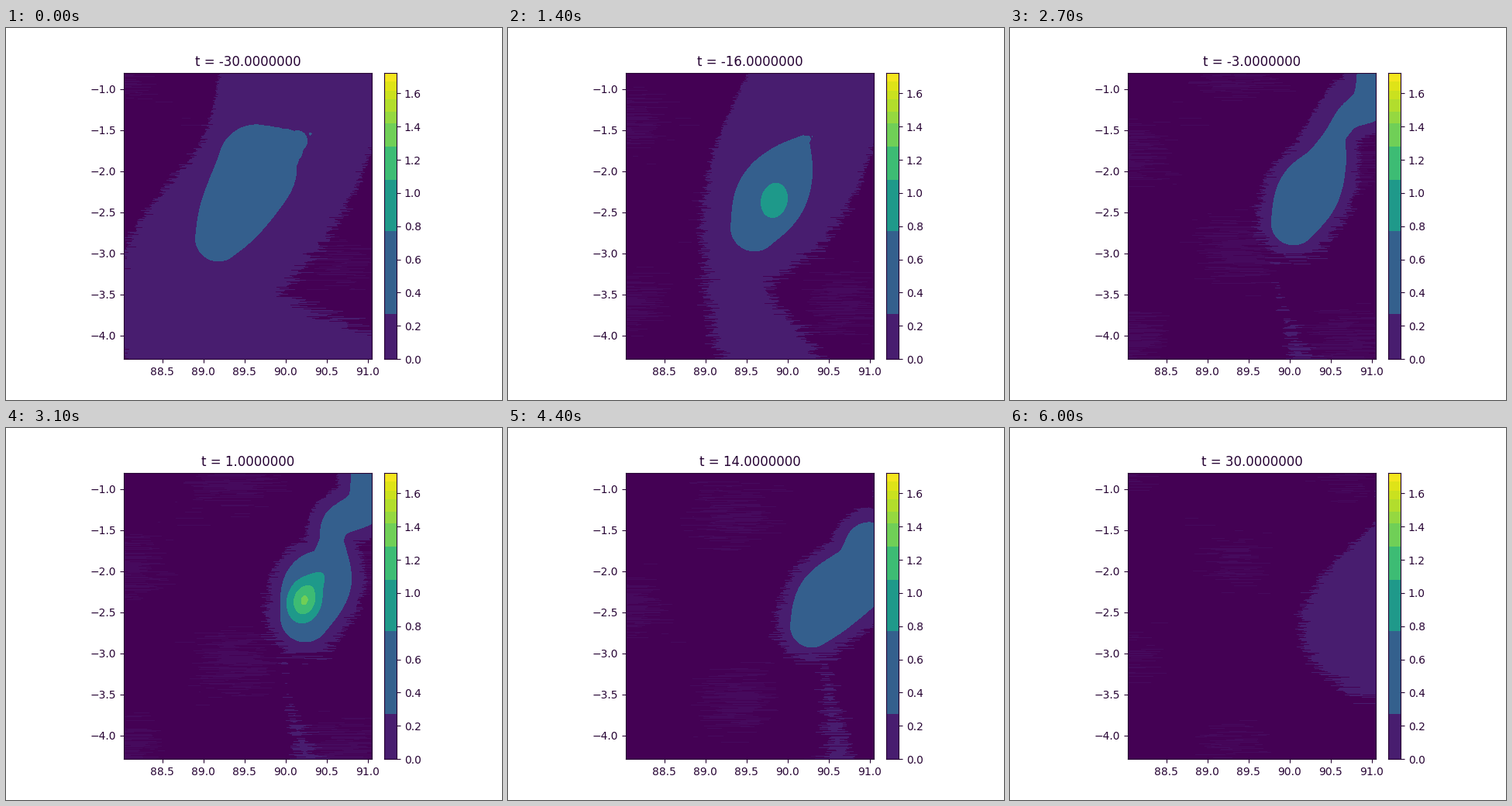
A matplotlib script for the animation above (6100 ms loop, 640 by 480 pixels).

```python
import numpy as np
import matplotlib.pyplot as plt
from matplotlib.animation import FuncAnimation
from matplotlib.colors import ListedColormap

W, H = 640, 480
LEFT, TOP, WIDTH, HEIGHT = 152, 57.6, 320, 369.6
INK = "#260333"
LEVELS = [0, 0.27, 0.77, 1.08, 1.28, 1.42, 1.49, 1.565, 1.615, 1.67, 1.725]
BANDS = [plt.cm.viridis((low + high) / 2 / LEVELS[-1])
         for low, high in zip(LEVELS, LEVELS[1:])]
PALETTE = ["#440154", "#460a5d"] + BANDS
HAZE, PURPLE, BLUE = 1, 2, 3

plt.rcParams["font.family"] = "DejaVu Sans"
for name in ("text.color", "axes.edgecolor", "xtick.color", "ytick.color"):
    plt.rcParams[name] = INK

xs = LEFT + np.arange(320, dtype=np.float32) + 0.5
ys = TOP + np.arange(370, dtype=np.float32) + 0.5
X, Y = np.meshgrid(xs, ys)

# Shapes are chains of circles (x, y, radius), keyed by time
BODY = {
    -30: [(274, 272, 30), (294, 237, 44), (321, 189, 52), (323, 174, 49)],
    -16: [(318, 258, 31), (338, 220, 45), (357, 188, 36), (381, 147, 8)],
    -8: [(341, 260, 26), (365, 222, 36), (394, 170, 25), (417, 134, 12)],
    1: [(386, 245, 32), (400, 207, 43), (416, 184, 29), (420, 146, 15)],
    14: [(392, 256, 28), (416, 222, 43), (457, 187, 40), (466, 153, 31)],
    22: [(410, 234, 19), (430, 222, 27), (462, 195, 35), (466, 160, 27)],
    30: [(470, 180, -18), (474, 175, -15), (478, 170, -12), (478, 160, -15)],
}
ARM = {
    -8: [(448, 107, 13), (470, 88, 25), (487, 50, 34)],
    1: [(428, 122, 19), (466, 98, 26), (487, 50, 42)],
}
CLOUD = {
    -30: [(390, 60, 112), (345, 190, 102), (235, 370, 100), (430, 465, 80)],
    -16: [(410, 60, 90), (350, 200, 92), (295, 330, 40), (340, 440, 60)],
    22: [(475, 150, 50), (420, 230, 58), (440, 300, 60), (455, 440, 75)],
    30: [(482, 152, 30), (432, 250, 55), (455, 300, 40), (457, 316, 34)],
}


def pose(keys, t):
    """Nodes at time t, moving evenly from key to key."""
    times = list(keys)
    k = min(max(np.searchsorted(times, t), 1), len(times) - 1)
    a, b = times[k - 1], times[k]
    u = np.clip((t - a) / (b - a), 0, 1)
    return (1 - u) * np.array(keys[a], float) + u * np.array(keys[b], float)


def spline(nodes, steps=9):
    """Open Catmull-Rom curve through the nodes."""
    p = np.vstack([nodes[:1], nodes, nodes[-1:]])[:, None]
    p0, p1, p2, p3 = p[:-3], p[1:-2], p[2:-1], p[3:]
    u = np.arange(steps)[None, :, None] / steps
    curve = 0.5 * (2 * p1 + (p2 - p0) * u
                   + (2 * p0 - 5 * p1 + 4 * p2 - p3) * u ** 2
                   + (3 * p1 - p0 - 3 * p2 + p3) * u ** 3)
    return np.vstack([curve.reshape(-1, 3), nodes[-1:]])


def depth(nodes):
    """Distance inside the chain in pixels, negative outside."""
    field = np.full(X.shape, -1e4, np.float32)
    for x, y, r in spline(nodes).astype(np.float32):
        np.maximum(field, r - np.sqrt((X - x) ** 2 + (Y - y) ** 2), out=field)
    return field


def blob(t):
    body = pose(BODY, t)
    arm = pose(ARM, t)
    arm[:, 2] -= np.interp(t, [-13, -8, 1, 6], [45, 0, 0, 45])
    return np.maximum(depth(body), depth(np.vstack([body[-1:], arm])))


def cloud(t):
    nodes = pose(CLOUD, t)
    nodes[:, 2] -= np.interp(t, [-16, -8, 14, 22], [0, 50, 55, 0])
    return depth(nodes)


def pulse(t, middle, width):
    return np.exp(-((t - middle) / width) ** 2)


def core(t):
    """Height of the bright centre, which drifts right and flares twice."""
    dx = X - (343.5 + 2.44 * (t + 16))
    dy = Y - 223
    dx = dx + 0.1 * dy
    peak = 0.7 + 0.34 * pulse(t, -16, 4) + 1.02 * pulse(t, 4, 4.15)
    main = peak * np.exp(-dx ** 2 / 1000 - dy ** 2 / 1700)
    side = 0.35 * pulse(t, 1, 4)
    return main + side * np.exp(-((dx - 22) ** 2 + (dy + 35) ** 2) / 300)


# Streaks: long along x, unrelated from row to row
rng = np.random.default_rng(4)
kernel = np.hanning(75)
streaks = np.array([np.convolve(row, kernel, "same")
                    for row in rng.normal(size=X.shape)])
streaks /= streaks.std()
rough = 1.5 + 5 * np.clip((Y - 100) / 250, 0, 1)


def bands(t):
    image = np.zeros(X.shape, int)
    wave = np.sin(X / 45 + 1.3) * np.sin(Y / 38 - t / 10)
    image[wave + 0.3 * streaks > 0.75 + (t / 60) ** 2] = HAZE
    shape = blob(t)
    halo = np.maximum(shape + 17, cloud(t))
    image[halo + rough * streaks > 0] = PURPLE
    image[shape > 0] = BLUE
    value = core(t)
    bright = value > LEVELS[2]
    image[bright] = 1 + np.digitize(value[bright], LEVELS[:-1])
    return image


def panel(x, width):
    return fig.add_axes([x / W, 1 - (TOP + HEIGHT) / H, width / W, HEIGHT / H])


fig = plt.figure(figsize=(W / 100, H / 100), dpi=100, facecolor="white")
ax = panel(LEFT, WIDTH)
picture = ax.imshow(bands(-30), cmap=ListedColormap(PALETTE), vmin=-0.5,
                    vmax=len(PALETTE) - 0.5, interpolation="nearest",
                    extent=(88.03, 91.05, -4.288, -0.8), aspect="auto")
ax.set_xticks(np.arange(88.5, 91.1, 0.5))
ax.set_yticks(np.arange(-4, -0.9, 0.5))
ax.xaxis.set_major_formatter("{x:.1f}")
title = ax.set_title("")

bar = panel(LEFT + 1.05 * WIDTH, 0.05 * WIDTH)
for low, high, color in zip(LEVELS, LEVELS[1:], BANDS):
    bar.axhspan(low, high, color=color, lw=0)
bar.set_xlim(0, 1)
bar.set_ylim(0, LEVELS[-1])
bar.set_xticks([])
bar.yaxis.tick_right()
bar.set_yticks(np.arange(0, 1.7, 0.2))
bar.yaxis.set_major_formatter("{x:.1f}")


def draw(i):
    t = i - 30
    picture.set_data(bands(t))
    title.set_text(f"t = {t:.7f}")
    return picture, title


anim = FuncAnimation(fig, draw, frames=61, interval=100, repeat=True)
plt.show()
```
